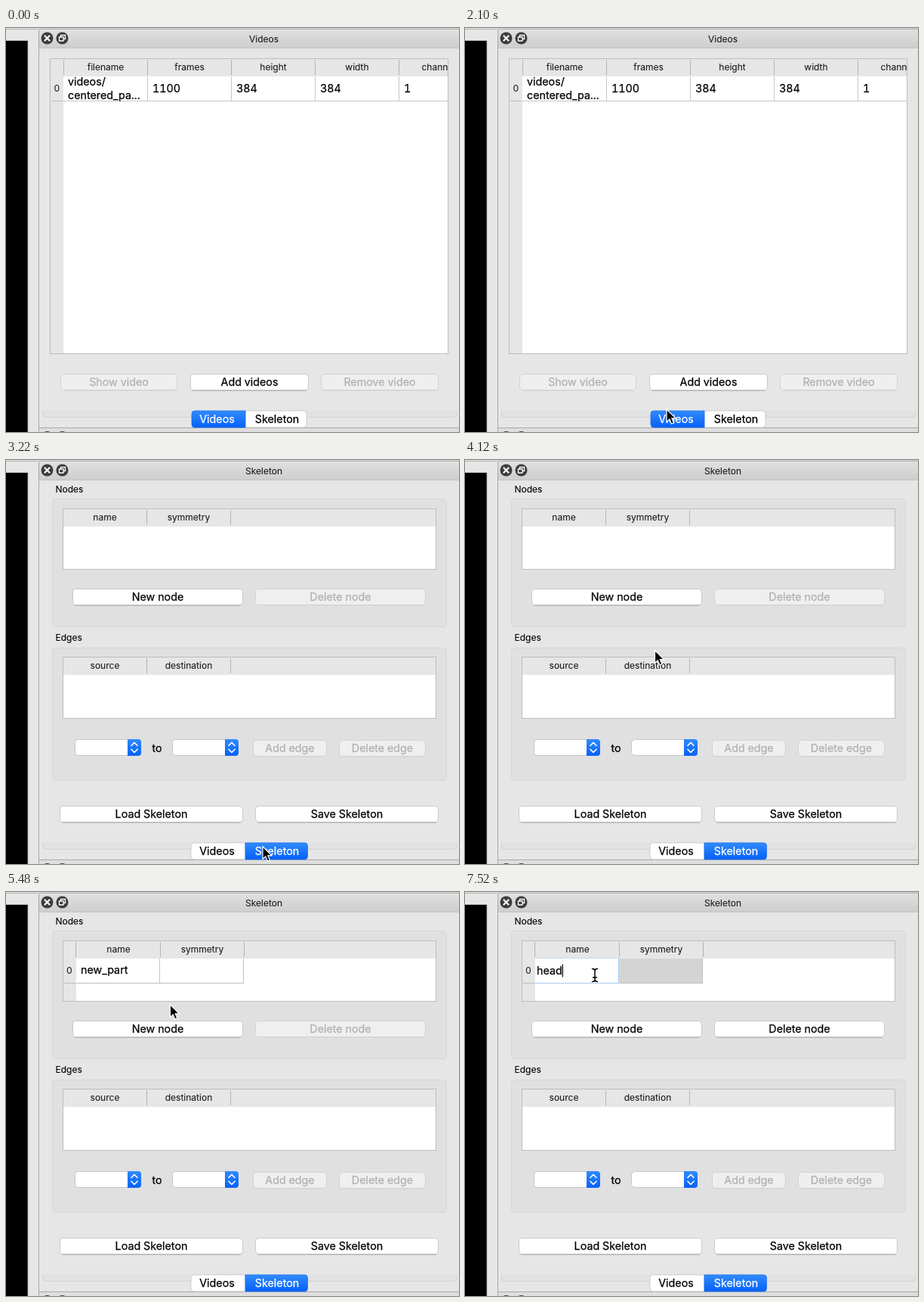
Recreate the animation shown at these times as an HTML page. Size 600 px wide and 534 px high, loop 8 s.

```html
<!DOCTYPE html>
<html lang="en">
<head>
<meta charset="utf-8">
<title>Skeleton editor</title>
<style>
  html, body { margin: 0; width: 100%; height: 100%; overflow: hidden; background: #e6e6e6; }
  svg { display: block; }
  text { font-family: Inter, "Open Sans", sans-serif; font-variant-numeric: tabular-nums; white-space: pre; }
</style>
</head>
<body>
<svg width="600" height="534" viewBox="0 0 600 534">
  <defs>
    <linearGradient id="bar" x2="0" y2="1"><stop stop-color="#e0e0e0"/><stop offset="1" stop-color="#cecece"/></linearGradient>
    <linearGradient id="blue" x2="0" y2="1"><stop stop-color="#318bfc"/><stop offset="1" stop-color="#0561f8"/></linearGradient>
    <clipPath id="table"><path d="M58 40H586V432H58Z"/></clipPath>
  </defs>
  <g id="scene"></g>
  <g id="arrow"><path d="M0 0V16.5L3.8 13L6.5 19.2L9.4 18L6.8 11.9H12Z" stroke="#fff" stroke-width="1.2"/></g>
  <g id="beam" transform="translate(172 110)" fill="none" stroke-linecap="round"></g>
</svg>
<script>
const $ = id => document.getElementById(id);
const BIG = 14.3, SMALL = 12, LINE = '#bdbdbd', PANEL = '#e6e6e6';

const beamPath = 'M-3.5 -8.5Q0 -8.5 0 -6Q0 -8.5 3.5 -8.5M0 -6V6M-3.5 8.5Q0 8.5 0 6Q0 8.5 3.5 8.5M-2.5 3H2.5';
$('beam').innerHTML = [['#fff', 3.4], ['#000', 1.5]]
  .map(([c, w]) => `<path d="${beamPath}" stroke="${c}" stroke-width="${w}"/>`).join('');

const rect = (x, y, w, h, fill, extra = '') =>
  `<rect x="${x}" y="${y}" width="${w}" height="${h}" fill="${fill}" ${extra}/>`;
const box = (x, y, w, h, fill, stroke, r = 0) =>
  rect(x + .5, y + .5, w - 1, h - 1, fill, `stroke="${stroke}" rx="${r}"`);
const hline = (x, y, w, c = LINE) => rect(x, y, w, 1, c);
const vline = (x, y, h, c = LINE) => rect(x, y, 1, h, c);
// a hairline stroke gives the large text its slightly heavier weight
const text = (s, x, y, size = BIG, fill = '#000', anchor = 'start', id = '') =>
  `<text id="${id}" x="${x}" y="${y}" font-size="${size}" fill="${fill}" stroke="${fill}" stroke-width="${size === BIG ? .25 : .1}" text-anchor="${anchor}">${s}</text>`;
const label = (s, x, y, size = SMALL, fill = '#1c1c1c') => text(s, x, y, size, fill, 'middle');

function button(s, x, y, w, mode = 'on') {
  const [fill, stroke, ink] = {
    on: ['#fff', '#c9c9c9', '#000'],
    off: ['#efefef', '#d3d3d3', '#b1b1b1'],
    down: ['url(#blue)', '#1767e0', '#fff']
  }[mode];
  return hline(x + 3, y + 22, w - 6, mode === 'off' ? '#dadada' : '#b9b9b9') +
    box(x, y, w, 22, fill, stroke, 4) + label(s, x + w / 2, y + 16, BIG, ink);
}

function combo(x) {
  return box(x, 369, 88, 22, '#fff', '#c6c6c6', 4) +
    `<path d="M${x + 70} 369h14q4 0 4 4v14q0 4-4 4h-14z" fill="url(#blue)"/>` +
    `<path d="M${x + 75} 377.5l4-4 4 4m0 5l-4 4-4-4" fill="none" stroke="#fff" stroke-width="1.7" stroke-linecap="round" stroke-linejoin="round"/>`;
}

function barIcons(y) {
  return `<g transform="translate(54.5 ${y})"><circle r="8" fill="#3d3d3d"/>
    <path d="M-3-3L3 3M3-3L-3 3" stroke="#fff" stroke-width="2.2" stroke-linecap="round"/>
    <circle cx="20" r="8" fill="#3d3d3d"/>
    <path d="M18-1.5V-4H24V1H21.5M16-1.5H21.5V3.5H16Z" fill="none" stroke="#fff" stroke-width="1.3"/></g>`;
}

function frame(title, tab) {
  const tabBox = (x, w, on, left) => {
    const d = left ? `M${x + w} 506H${x + 4}q-4 0-4 4v14q0 4 4 4H${x + w}Z`
                   : `M${x} 506h${w - 4}q4 0 4 4v14q0 4-4 4H${x}Z`;
    return `<path d="${d}" fill="${on ? 'url(#blue)' : '#fff'}" stroke="${on ? '#1c6fe8' : '#c4c4c4'}" stroke-width=".8"/>`;
  };
  return rect(0, 0, 600, 534, PANEL) +
    hline(0, 1, 43, '#b2b2b2') + hline(0, 16, 29, '#b8b8b8') + rect(0, 17, 28, 517, '#000') +
    vline(28, 17, 517, '#444') + vline(29, 16, 518, '#d0d0d0') + vline(43, 2, 532, '#a9a9a9') +
    rect(44, 0, 556, 2, '#d6d6d6') + hline(44, 1, 556, '#b2b2b2') +
    rect(44, 2, 556, 24, 'url(#bar)') + hline(44, 26, 556, '#c2c2c2') +
    barIcons(13.5) + label(title, 341.5, 19) +
    '<path d="M48.5 506V511q0 3.5 3.5 3.5H593q3.5 0 3.5-3.5V506" fill="#e2e2e2" stroke="#d2d2d2"/>' +
    hline(44, 528, 556, '#aaa') + rect(44, 529, 556, 5, '#dedede') + barIcons(541) +
    (tab ? tabBox(245, 72, 0, 1) + tabBox(317, 82.5, 1, 0)
         : tabBox(317, 81, 0, 0) + tabBox(246, 71, 1, 1)) +
    label('Videos', 279.5, 522, BIG, tab ? '#000' : '#fff') +
    label('Skeleton', 359, 522, BIG, tab ? '#fff' : '#000');
}

function videosView() {
  const cols = [76, 187, 298, 409, 520];
  const heads = ['filename', 'frames', 'height', 'width', 'channels'];
  const cells = ['', '1100', '384', '384', '1'];
  return frame('Videos', 0) +
    box(58, 40, 528, 391, PANEL, LINE) + rect(76, 64, 509, 366, '#fff') +
    '<g clip-path="url(#table)">' +
    cols.map((x, i) => vline(x, 42, 20, '#b4b4b4') + label(heads[i], x + 56, 56) +
      text(cells[i], x + 7, 85) + (i ? vline(x, 64, 33, '#c6c6c6') : '')).join('') + '</g>' +
    hline(76, 96, 509, '#c6c6c6') + hline(60, 96, 15, '#bbb') + label('0', 67.5, 84) +
    text('videos/', 82, 76) + text('centered_pa...', 82, 94) +
    button('Show video', 72, 457, 155, 'off') + button('Add videos', 244, 457, 157) +
    button('Remove video', 417, 457, 156, 'off');
}

function table(y, h, heads, shift) {
  return box(75, y, 495, h, PANEL, LINE) + rect(76, y + 24, 493, h - 25, '#fff') +
    heads.map((s, i) => label(s, 131 + 111 * i + shift, y + 16) +
      vline(186 + 111 * i + shift, y + 2, 20, '#b4b4b4')).join('');
}

// row: 0 none, 1 plain, 2 selected, 3 editing with marked text, 4 typing
function nodeRow(row, typed) {
  if (!row) return '';
  let s = rect(76, 88, 17, 56, PANEL) + vline(92, 66, 20, '#b4b4b4') +
    hline(77, 120, 15, '#bbb') + label('0', 84, 108);
  if (row === 2) s += rect(93, 88, 222, 32, '#0b60d8');
  if (row > 2) s += rect(205, 88, 109, 32, '#d4d4d4');
  s += hline(93, 120, 222, '#c0c0c0') + vline(203, 88, 32, '#c6c6c6') + vline(314, 88, 33, '#c0c0c0');
  if (row < 3) return s + text('new_part', 99, 108, BIG, row === 2 ? '#fff' : '#000');
  s += rect(93, 88, 110, 32, '#fff') + vline(203, 88, 33, '#a9c9ec') + vline(204, 88, 33, '#cfe0f2') +
    hline(93, 120, 111, '#a9c9ec') + hline(93, 87, 111, '#c6dbf1');
  if (row === 3) return s + rect(95, 95, 63, 18, '#b3d7ff') + text('new_part', 95, 109);
  return s + text(typed, 95, 109, BIG, '#000', 'start', 'typed') +
    rect(95, 95.5, 1.2, 17, '#000', 'id="caret"');
}

function skeletonView(row, pressed, typed) {
  const group = (y, h) => box(61, y, 523, h, '#e0e0e0', '#d6d6d6', 4);
  return frame('Skeleton', 1) +
    text('Nodes', 65.5, 43, SMALL) + group(51, 170) +
    table(64, 81, ['name', 'symmetry'], row ? 18 : 0) + nodeRow(row, typed) +
    button('New node', 88, 170, 226, pressed ? 'down' : 'on') +
    button('Delete node', 330, 170, 226, row > 1 ? 'on' : 'off') +
    text('Edges', 65.5, 239, SMALL) + group(248, 176) +
    table(260, 82, ['source', 'destination'], 0) +
    combo(91) + text('to', 193.5, 386) + combo(220) +
    button('Add edge', 327, 370, 98, 'off') + button('Delete edge', 441, 370, 115, 'off') +
    button('Load Skeleton', 71, 457, 243) + button('Save Skeleton', 330, 457, 243);
}

// pointer tip: time, x, y
const path = [
  [1620, 179, 533], [2100, 267, 504], [2420, 284, 504.5], [2760, 340, 511],
  [3600, 340, 511], [3760, 322, 448], [3940, 280, 340], [4120, 251.5, 252], [4260, 250, 214],
  [4400, 254, 192], [4580, 254.5, 183], [5360, 254, 182], [5480, 217.5, 149],
  [5700, 192, 128], [5920, 177, 114], [6160, 172, 110]
];

function tip(t) {
  const i = path.findIndex(p => p[0] > t);
  if (i < 0) return path[path.length - 1].slice(1);
  const a = path[i - 1], b = path[i], k = (t - a[0]) / (b[0] - a[0]);
  return [1, 2].map(j => a[j] + (b[j] - a[j]) * k);
}

let shown;
function draw(now) {
  const t = now % 8000;
  const row = [4920, 6180, 6340, 6540].filter(x => t >= x).length;
  const typed = 'head'.slice(0, [7080, 7180, 7300, 7420].filter(x => t >= x).length);
  const pressed = t >= 4800 && t < 4920;
  const key = [t >= 3100, row, typed, pressed].join();
  if (key !== shown) {
    shown = key;
    $('scene').innerHTML = t < 3100 ? videosView() : skeletonView(row, pressed, typed);
    if (row === 4) $('caret').setAttribute('x', 95 + (typed ? $('typed').getComputedTextLength() : 0));
  }
  const editing = row > 2;
  $('beam').style.display = editing ? '' : 'none';
  $('arrow').style.display = t >= 1620 && !editing ? '' : 'none';
  if (t >= 1620) $('arrow').setAttribute('transform', `translate(${tip(t)})`);
  requestAnimationFrame(() => draw(performance.now()));
}
draw(performance.now());
</script>
</body>
</html>
```
